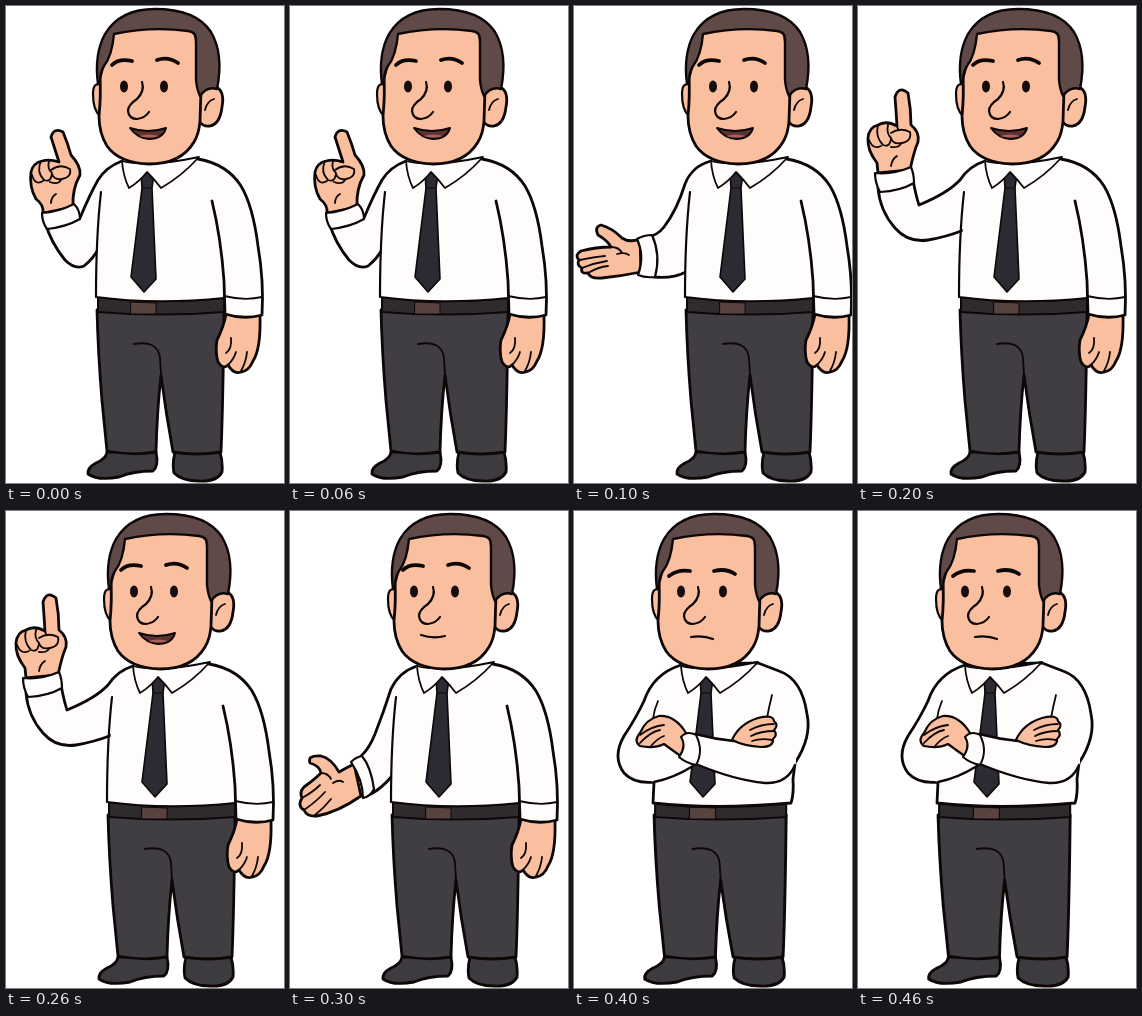
Write an HTML page that moves like this. It is 278x477 px and loops after 0.5 s.

```html
<!DOCTYPE html>
<html lang="en">
<head>
<meta charset="utf-8">
<title>Talking man</title>
<style>
html, body { margin: 0; width: 100%; height: 100%; overflow: hidden; background: #fff; }
svg { display: block; width: 278px; height: 477px; }
</style>
</head>
<body>
<svg id="stage" viewBox="0 0 278 477" stroke="#0d0708" stroke-linecap="round" stroke-linejoin="round"></svg>
<script>
const SKIN = '#fabf9f', HAIR = '#604a48', SHIRT = '#fefdfb', PANTS = '#413e43',
      SHOE = '#3e3b40', TIE = '#2c2b33', BELT = '#2e2a2d';
const HOLD = 100;

const path = (d, fill = 'none', w = 2.8) =>
  `<path d="${d}" fill="${fill}" stroke-width="${w}"/>`;
const line = (d, w = 1.8) => path(d, 'none', w);
const area = (d, fill) => `<path d="${d}" fill="${fill}" stroke="none"/>`;
const shift = (x, s, stretch = 1) =>
  `<g transform="translate(${x}) scale(${stretch} 1)">${s}</g>`;

const legs =
  path('M112 446Q111 453 101 457Q92 462 93 468Q103 475 124 471Q138 465 158 465Q164 460 161 446Z', SHOE) +
  path('M180 446Q177 458 179 467Q187 475 204 475Q222 476 227 466Q228 456 225 446Z', SHOE) +
  path('M102 304Q103 346 107 395L112 445Q137 450 161 446Q162 405 166 369Q171 408 178 446Q202 450 226 446Q228 400 229 304Z', PANTS) +
  line('M139 338Q163 334 165 352L166 369') +
  path('M103 291Q160 299 229 292L229 306Q165 311 103 306Z', BELT, 2) +
  path('M136 296L161 297V308L136 308Z', '#58443f', 1);

const torso =
  area('M127 155L112 180Q101 230 101 291Q160 299 229 292V180L203 153Z', SHIRT) +
  line('M106 186Q101 230 101 291Q160 299 229 292', 2.2);

const sideArm =
  path('M231 308Q229 320 222 334Q220 346 223 356Q228 364 233 359Q239 369 246 366Q254 365 258 355Q266 343 265 309Z', SKIN) +
  line('M236 332Q237 343 231 347M233 359Q239 353 241 346M246 365Q251 356 252 346') +
  path('M203 153Q232 158 246 180Q258 200 263 240Q269 275 267 309Q249 314 230 308L229 275Q226 232 217 195', SHIRT) +
  line('M229 290Q250 295 267 291');

const collar =
  path('M146 168L152 164L159 168L157 182L161 273L149 286L136 271L147 182Z', TIE, 1.6) +
  line('M147 182H157', 1) +
  path('M127 155Q128 170 134 182Q144 176 152 166Q160 174 166 182Q187 170 204 151Q152 162 127 155Z', SHIRT, 1.8);

const skull =
  path('M107 79Q98 75 98 88Q98 104 105 110Z', SKIN, 2.2) +
  path('M205 89Q212 79 221 81Q230 85 227 101Q225 118 215 120Q208 121 204 115Z', SKIN) +
  line('M210 104Q212 95 219 93') +
  path('M105 72Q106 90 104 110Q104 127 112 140Q124 157 154 158Q186 158 199 136Q204 128 205 115L206 84L200 22H118Z', SKIN) +
  path('M103 78Q99 48 110 28Q125 3 160 3Q201 3 216 26Q229 48 222 83Q212 80 205 90Q202 84 201 74V33Q201 26 193 25Q156 20 119 28Q117 50 109 60Q105 66 105 76Z', HAIR, 2.4);

const openMouth =
  path('M133 122Q151 128 169 122Q166 133 152 133Q140 132 133 122Z', '#5e3231', 2) +
  area('M142 130Q152 127 162 130Q153 133 142 130Z', '#a9625a');

const calm = 'M115 59Q122 52 135 55M160 54Q171 50 181 57';

function face({ eyes: [l, r], brows = calm, mouth = openMouth, nudge = 0 }) {
  const eye = x => `<ellipse cx="${x}" cy="80.5" rx="4" ry="6" fill="#160d0e" stroke="none"/>`;
  const nose = line('M145 76Q148 85 140 93Q131 99 131 105Q132 113 140 113Q148 112 152 106', 2.2);
  return skull + eye(l) + eye(r) + shift(nudge, line(brows, 3.8) + nose + mouth);
}

const pointUp =
  path('M127 155Q111 160 102 174Q90 187 61 199Q58 190 55 174L20 182Q22 205 37 222Q50 237 70 234Q88 231 106 224', SHIRT) +
  path('M20 167L19 157Q9 144 10 132Q11 121 20 119Q28 114 39 120Q38 104 37 91Q41 79 50 87Q53 103 53 119Q62 126 60 136Q56 145 52 164Z', SKIN) +
  line('M20 119Q17 131 25 139Q32 142 33 132Q28 127 30 119M33 127Q42 121 52 126Q54 135 44 137Q35 139 33 132M11 134Q15 144 23 140M33 141Q40 142 43 138M39 120L40 123M39 150Q34 153 33 160') +
  path('M17 167Q34 169 53 161Q56 168 56 177Q42 185 22 186Q17 177 17 167Z', SHIRT, 2.2);

const pointLow =
  path('M116 155Q100 161 92 174Q84 188 74 212L71 207L39 216Q45 237 59 254Q69 264 78 260Q87 253 93 242', SHIRT) +
  path('M37 207Q38 199 30 193Q23 181 25 166Q27 157 36 155Q44 153 53 156L45 131Q48 121 57 126Q62 138 65 149Q75 160 74 169Q66 183 67 201Z', SKIN) +
  line('M35 155Q30 166 38 174Q45 177 46 167Q41 163 43 155M45 164Q54 157 64 163Q66 171 56 173Q48 174 46 168M26 169Q29 180 37 175M44 176Q52 179 55 174M50 188Q45 191 45 197') +
  path('M36 207Q52 206 68 198Q74 204 74 213Q60 221 41 223Q36 216 36 207Z', SHIRT, 2.2);

const offerWide =
  path('M137 155Q118 160 111 178Q103 204 90 221Q84 229 72 232L80 271Q98 273 112 266', SHIRT) +
  path('M66 233Q55 237 48 232Q38 222 27 219Q20 221 24 229Q33 234 37 241Q22 241 7 245Q0 249 5 254Q2 259 8 262Q6 268 14 267Q16 273 28 272Q48 270 67 266Z', SKIN) +
  line('M6 254Q20 251 31 250M8 262Q20 257 33 255M14 267Q24 261 34 260M37 241Q45 241 48 247M43 248Q51 246 55 249') +
  path('M63 233Q70 229 78 229Q87 249 81 271Q71 272 64 269Q71 250 63 233Z', SHIRT, 2.2);

const offerLow =
  path('M127 155Q109 161 101 178Q94 200 85 223Q79 238 71 245L81 283Q92 277 102 265', SHIRT) +
  path('M64 253Q56 257 49 261Q41 247 31 245Q17 244 20 252Q30 255 31 262Q25 268 14 276Q9 281 12 287Q7 295 14 299Q17 306 27 305Q48 301 71 285Z', SKIN) +
  line('M12 287Q23 281 30 274M14 299Q27 290 35 281M25 304Q34 297 41 288M31 262Q38 262 41 268M43 272Q49 268 53 271') +
  path('M61 251Q66 246 72 245Q81 256 84 278Q80 286 73 287Q73 269 61 251Z', SHIRT, 2.2);

const foldedBody =
  path('M107 154Q79 163 70 190Q62 207 50 225Q38 246 50 262Q60 273 80 271L79 292Q140 299 217 292Q220 283 219 268L221 252Q238 226 233 203Q228 168 205 160L184 152Z', SHIRT);

const foldedArms =
  area('M52 262L64 234L107 224L122 253Q95 268 80 271Z', SHIRT) +
  area('M121 223Q140 228 160 230L222 232V252Q215 274 191 272Q160 269 122 253Z', SHIRT) +
  line('M84 190Q80 199 79 208M198 184Q195 196 193 207') +
  line('M80 271Q100 267 119 255M121 223Q140 228 160 230M122 253Q160 269 191 272Q213 273 221 254', 2.4) +
  path('M158 229Q165 213 184 207Q199 203 200 210Q205 214 200 219Q204 224 199 228Q200 236 187 236Q170 235 158 229Z', SKIN, 2.2) +
  line('M200 213Q187 213 176 219M200 220Q187 220 177 225M198 229Q187 227 178 230') +
  path('M108 246Q98 239 90 233Q80 238 66 235Q59 230 66 222Q72 208 85 205Q101 204 112 222Z', SKIN, 2.2) +
  line('M66 224Q78 215 90 214M66 232Q76 221 86 219M77 235Q84 227 90 225') +
  path('M107 226Q113 219 122 224Q130 240 122 254Q112 252 105 246Q113 235 107 226Z', SHIRT, 2);

const poses = [
  { x: -11, arm: pointLow, eyes: [129, 169], nudge: 2 },
  { x: 10, arm: offerWide, eyes: [129, 170] },
  { x: 0, arm: pointUp, eyes: [128, 168] },
  { x: 0, arm: offerLow, eyes: [124, 165], nudge: -2,
    mouth: line('M133 124Q145 128 157 125', 2.2) },
  { x: -20, folded: true, eyes: [127, 169], nudge: -1,
    brows: 'M116 65Q125 58 137 60M161 60Q173 57 182 63',
    mouth: line('M138 126Q150 124 160 128', 2.2) }
];

function figure(p) {
  const top = p.folded
    ? shift(-26, legs, 1.04) + foldedBody + shift(p.x, collar) + foldedArms
    : shift(p.x, legs) + p.arm + shift(p.x, torso + sideArm + collar);
  return top + shift(p.x, face(p));
}

const stage = document.getElementById('stage');
const drawings = poses.map(figure);
let shown = -1;

function render(ms) {
  const i = Math.floor(ms / HOLD) % poses.length;
  if (i !== shown) stage.innerHTML = drawings[shown = i];
}

const start = performance.now();
function tick() {
  render(performance.now() - start);
  requestAnimationFrame(tick);
}
tick();
</script>
</body>
</html>
```
